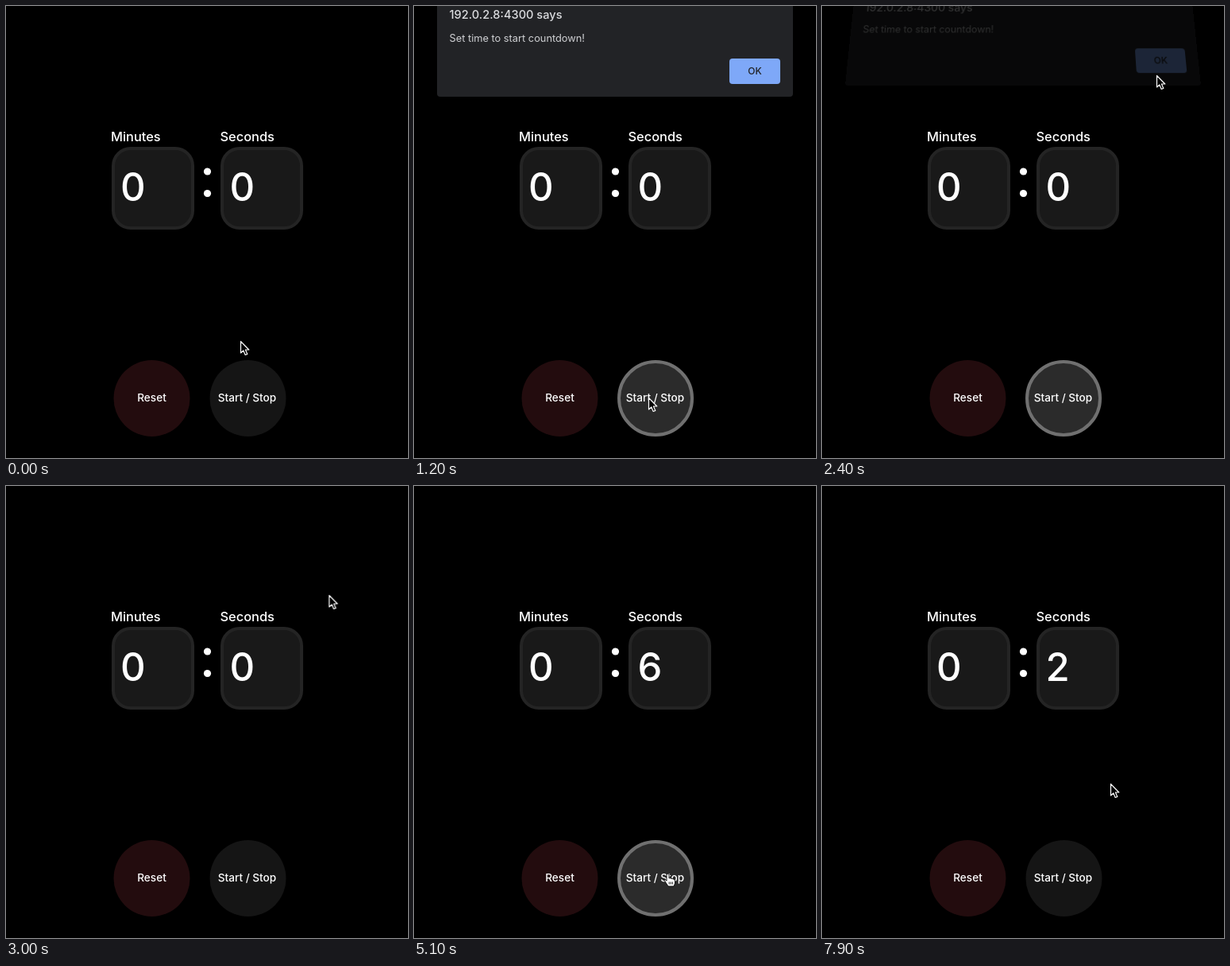
Recreate the animation shown at these times as an HTML page. Size 506x568 px, loop 8 s.

```html
<!DOCTYPE html>
<html lang="en">
<head>
<meta charset="utf-8">
<title>Countdown timer</title>
<style>
  html, body {
    margin: 0;
    width: 100%;
    height: 100%;
    overflow: hidden;
    background: #000;
  }
  body { position: relative; }
  svg { position: absolute; left: 0; top: 0; overflow: hidden; }
  text { font-family: Inter, "Open Sans", sans-serif; font-weight: 500; fill: #fff; }
  .label { font-size: 16.4px; }
  .digit { font-size: 49px; }
  .caption { font-size: 13.6px; text-anchor: middle; }
  .box { fill: #191919; stroke: #242424; stroke-width: 4; }

  /* every animated part shares the 8 s loop and changes in hard steps */
  .a { animation: 8s step-end infinite; }

  .value { animation-name: value; }
  @keyframes value {
    0%     { transform: translateY(0); }
    43.75% { transform: translateY(-100px); }
    45%    { transform: translateY(-200px); }
    46.25% { transform: translateY(-300px); }
    47.5%  { transform: translateY(-400px); }
    48.75% { transform: translateY(-500px); }
    52.5%  { transform: translateY(-600px); }
    65%    { transform: translateY(-500px); }
    75%    { transform: translateY(-400px); }
    85%    { transform: translateY(-300px); }
    95%, 100% { transform: translateY(-200px); }
  }

  .focus { animation-name: focus; }
  @keyframes focus {
    0% { opacity: 0; }
    43.75% { opacity: 1; }
    62.5%, 100% { opacity: 0; }
  }
  .spinner { animation-name: spinner; }
  @keyframes spinner {
    0% { opacity: 0; }
    42.5% { opacity: 1; }
    62.5%, 100% { opacity: 0; }
  }
  .lit { animation-name: lit; }
  @keyframes lit {
    0% { opacity: 0; }
    42.5% { opacity: 1; }
    55%, 100% { opacity: 0; }
  }
  .hover { animation-name: hover; }
  @keyframes hover {
    0% { opacity: 0; }
    7.5% { opacity: 1; }
    31.25% { opacity: 0; }
    58.75% { opacity: 1; }
    68.75%, 100% { opacity: 0; }
  }
  .hand { animation-name: hand; }
  @keyframes hand {
    0% { opacity: 0; }
    7.5% { opacity: 1; }
    11.25% { opacity: 0; }
    58.75% { opacity: 1; }
    68.75%, 100% { opacity: 0; }
  }
  .arrow { animation-name: arrow; }
  @keyframes arrow {
    0% { opacity: 1; }
    7.5% { opacity: 0; }
    11.25% { opacity: 1; }
    58.75% { opacity: 0; }
    68.75%, 100% { opacity: 1; }
  }

  .dialog {
    position: absolute;
    left: 29px;
    top: 0;
    width: 448px;
    height: 114px;
    transform-origin: 50% 100%;
    animation-name: dialog;
  }
  .dialog svg { overflow: visible; }
  @keyframes dialog {
    0% { opacity: 0; transform: none; }
    11.25% { opacity: .22; transform: translateY(-14px) perspective(200px) rotateX(5.4deg); }
    12.5% { opacity: 1; transform: none; }
    30% { opacity: .22; transform: translateY(-14px) perspective(200px) rotateX(5.4deg); }
    31.25%, 100% { opacity: 0; transform: none; }
  }

  /* the pointer advances once per 100 ms */
  .pointer { animation: pointer 8s infinite; }
  @keyframes pointer {
    0%     { transform: translate(295px, 421px); animation-timing-function: step-end; }
    3.75%  { transform: translate(295px, 421px); animation-timing-function: steps(4); }
    8.75%  { transform: translate(295px, 492px); animation-timing-function: step-end; }
    16.25% { transform: translate(295px, 492px); animation-timing-function: steps(2); }
    18.75% { transform: translate(335px, 360px); animation-timing-function: steps(3); }
    22.5%  { transform: translate(407px, 130px); animation-timing-function: steps(2); }
    25%    { transform: translate(422px, 82px); animation-timing-function: step-end; }
    28.75% { transform: translate(422px, 82px); animation-timing-function: step-end; }
    30%    { transform: translate(421px, 87px); animation-timing-function: steps(5); }
    36.25% { transform: translate(422px, 113px); animation-timing-function: steps(3); }
    40%    { transform: translate(375px, 185px); animation-timing-function: steps(2); }
    42.5%  { transform: translate(355px, 206px); animation-timing-function: step-end; }
    53.75% { transform: translate(355px, 206px); animation-timing-function: steps(3); }
    57.5%  { transform: translate(328px, 410px); animation-timing-function: steps(2); }
    60%    { transform: translate(320px, 487px); animation-timing-function: step-end; }
    66.25% { transform: translate(320px, 487px); animation-timing-function: steps(3); }
    70%    { transform: translate(351px, 409px); animation-timing-function: steps(2); }
    72.5%  { transform: translate(363px, 375px); animation-timing-function: step-end; }
    77.5%, 100% { transform: translate(363px, 374px); animation-timing-function: step-end; }
  }
</style>
</head>
<body>
<svg width="506" height="568" viewBox="0 0 506 568">
  <clipPath id="window"><rect x="276" y="195" width="70" height="68"/></clipPath>

  <text class="label" x="132" y="170">Minutes</text>
  <text class="label" x="269.5" y="170">Seconds</text>

  <rect class="box" x="135" y="179" width="100" height="100" rx="22"/>
  <rect class="box" x="272" y="179" width="100" height="100" rx="22"/>
  <text class="digit" x="144" y="245">0</text>
  <g fill="#fff">
    <circle cx="253.5" cy="208" r="4.6"/>
    <circle cx="253.5" cy="235.5" r="4.6"/>
  </g>

  <g class="a focus" fill="none">
    <rect x="272.2" y="179.2" width="99.6" height="99.6" rx="22" stroke="#1d56ab" stroke-width="3.4"/>
    <rect x="269.8" y="176.8" width="104.4" height="104.4" rx="24.5" stroke="#fff" stroke-width="1.5"/>
    <path d="M312.5 195V262" stroke="#fff"/>
  </g>

  <g clip-path="url(#window)">
    <g class="a value">
      <text class="digit" x="281.5" y="245">0</text>
      <text class="digit" x="281.5" y="345">1</text>
      <text class="digit" x="281.5" y="445">2</text>
      <text class="digit" x="281.5" y="545">3</text>
      <text class="digit" x="281.5" y="645">4</text>
      <text class="digit" x="281.5" y="745">5</text>
      <text class="digit" x="281.5" y="845">6</text>
    </g>
  </g>

  <g class="a spinner">
    <rect x="347" y="193" width="15" height="72" fill="#efefef"/>
    <rect class="a lit" x="347" y="193" width="15" height="36" fill="#c8c8c8"/>
    <path d="M347 216L354.5 208L362 216ZM347 243H362L354.5 251Z" fill="#4c4c4c"/>
  </g>

  <circle cx="183.5" cy="493" r="48" fill="#230c0e"/>
  <circle cx="304.5" cy="493" r="48" fill="#151515"/>
  <circle class="a hover" cx="304" cy="493" r="46" fill="#2b2b2b" stroke="#707070" stroke-width="4"/>
  <text class="caption" x="183.5" y="497">Reset</text>
  <text class="caption" x="303.5" y="497">Start / Stop</text>
</svg>

<div class="a dialog">
  <svg width="448" height="114" viewBox="29 0 448 114">
    <path d="M29 -40H477V110Q477 114 473 114H33Q29 114 29 110Z" fill="#222326"/>
    <text x="44.5" y="16" font-size="14.6" style="fill:#dcdde0">192.0.2.8:4300 says</text>
    <text x="44.5" y="45" font-size="12.8" style="fill:#d0d1d4;font-weight:400">Set time to start countdown!</text>
    <rect x="397" y="66" width="64" height="32" rx="4" fill="#7ea8f8"/>
    <text x="429" y="86.3" font-size="12" text-anchor="middle" style="fill:#202124">OK</text>
  </svg>
</div>

<svg width="506" height="568" viewBox="0 0 506 568">
  <g class="pointer">
    <path class="a arrow" d="M.5 .5V15L3.8 12L6.2 17.5L8.8 16.4L6.4 11H10.8Z" fill="#000" stroke="#fff" stroke-width="1.2" stroke-linejoin="round"/>
    <g class="a hand" fill="#fff" stroke="#000" stroke-width=".9" stroke-linejoin="round">
      <path d="M-2 2Q-2 .3 -.5 .3T1 2V6Q2.6 5 3.6 6.4Q5.2 5.6 6 7Q8.4 6.4 8.5 9V12Q8 14 7 16H0Q-2 13 -4 10Q-5 8.2 -3.8 7.8T-2 9.2Z"/>
      <path d="M1.2 10.5V13.5M3.3 10.5V13.5M5.4 10.5V13.5" fill="none"/>
    </g>
  </g>
</svg>
</body>
</html>
```
